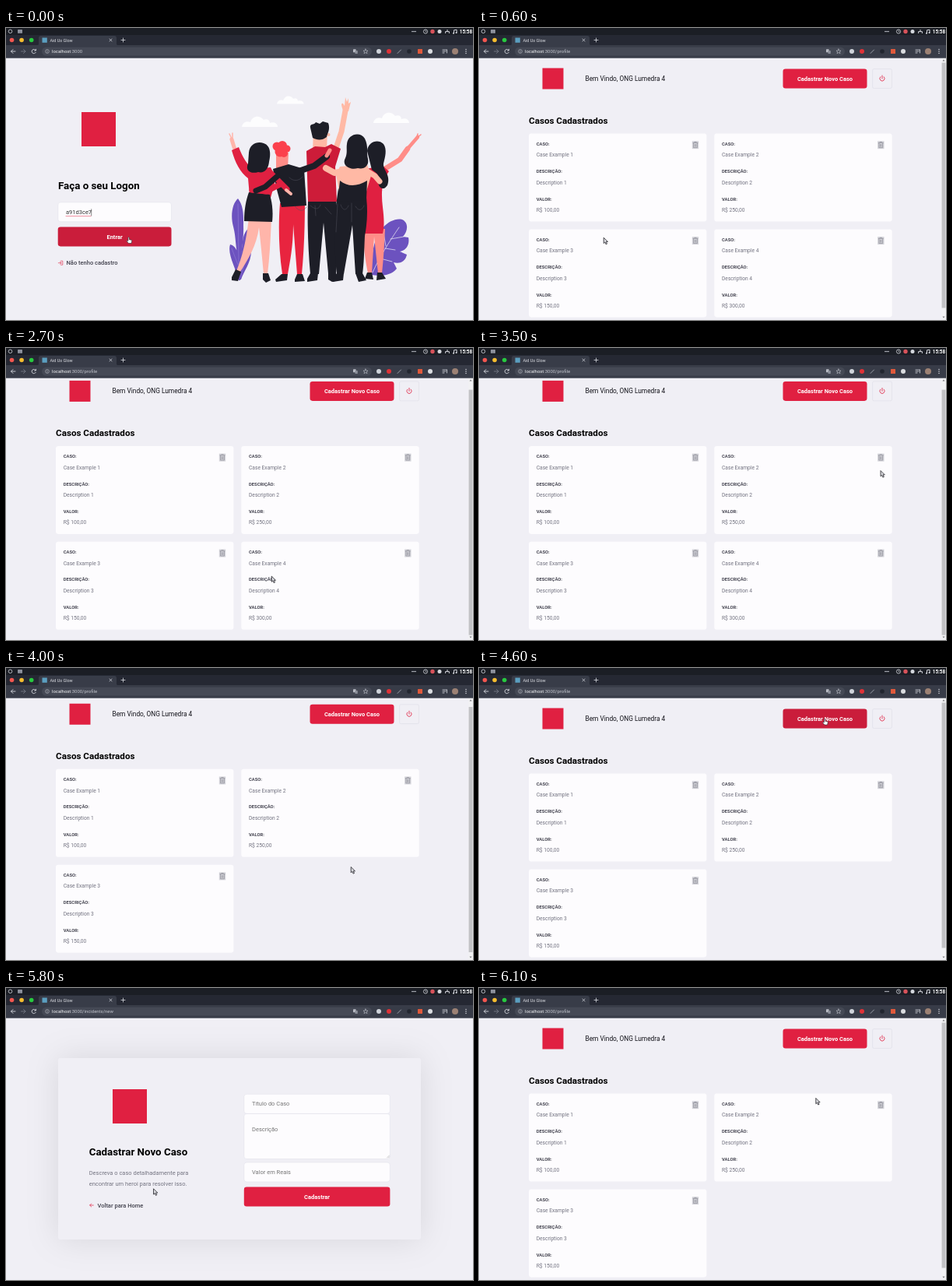
These frames come from a looping animation (600x375 px, 6.2 s). An HTML page:

```html
<!DOCTYPE html>
<html lang="pt">
<head>
<meta charset="utf-8">
<title>Aid Us Glow</title>
<style>
  html, body { margin: 0; width: 100%; height: 100%; overflow: hidden; background: #f0eff5; }
  svg { display: block; width: 600px; height: 375px; font-family: Roboto, sans-serif; }
</style>
</head>
<body>
<svg id="stage" viewBox="0 0 600 375" xmlns="http://www.w3.org/2000/svg"></svg>
<script>
const RED = '#e02041', RED_HOVER = '#ca1d3b', INK = '#41414d', GREY = '#737380';
const BG = '#f0eff5', PAPER = '#fdfcfe', LINE = '#dcdce6';
const BLACK = '#1d1e27', PURPLE = '#6c52bf', SEAM = '#50505c';

const text = (x, y, size, str, fill = GREY, weight = 400, anchor = 'start') =>
  `<text x="${x}" y="${y}" font-size="${size}" fill="${fill}" font-weight="${weight}" text-anchor="${anchor}">${str}</text>`;
const rect = (x, y, w, h, fill, r = 0, extra = '') =>
  `<rect x="${x}" y="${y}" width="${w}" height="${h}" rx="${r}" fill="${fill}" ${extra}/>`;
const dot = (x, y, r, fill, extra = '') => `<circle cx="${x}" cy="${y}" r="${r}" fill="${fill}" ${extra}/>`;
const shape = (fill, d) => `<path fill="${fill}" d="${d}"/>`;
const line = (color, width, d) =>
  `<path fill="none" stroke="${color}" stroke-width="${width}" stroke-linecap="round" stroke-linejoin="round" d="${d}"/>`;
const field = (x, y, w, h) => rect(x, y, w, h, PAPER, 3.3, `stroke="${LINE}" stroke-width=".5"`);
const button = (id, x, y, w, label) =>
  rect(x, y, w, 25, RED, 3.3, `id="${id}"`) + text(x + w / 2, y + 15.2, 7.5, label, '#fff', 700, 'middle');
const mark = (cx, cy, size) => rect(cx - size / 2, cy - size / 2, size, size, RED);

function cloud(x, y, s) {
  return `<g transform="translate(${x} ${y}) scale(${s})">` +
    shape('#fdfdfe', 'M0 14C1 8 6 6 11 8C13 0 23-2 28 5C32 3 36 5 36 9C42 7 46 10 46 14Z') + '</g>';
}

function illustration() {
  const skin = '#ffb5aa', peach = '#ffb9a5', coral = '#ff8d88', pants = '#e8243f', shirt = '#cd1c39';
  return cloud(303, 113, 1) + cloud(348, 87, .75) + cloud(472, 108, 1) +
    // plants
    shape(PURPLE, 'M299 324C295 308 284 290 288 278C296 280 299 290 299 297C294 280 296 270 292 255C288 240 291 225 298 219C306 229 305 244 305 254C306 276 299 302 301 324Z') +
    shape(PURPLE, 'M300 323C299 301 303 288 304 274C305 262 312 255 317 255C319 265 314 275 315 286C315 302 305 313 302 323Z') +
    line('#9a87dc', .5, 'M300 320C298 290 299 260 298 226M302 318C308 298 310 280 314 262M298 304L290 283') +
    shape(PURPLE, 'M468 317C470 300 470 286 475 272C480 256 496 243 509 246C518 250 516 262 510 268L517 269C519 278 514 286 506 287L515 291C513 301 505 303 498 301L502 309C493 320 478 318 468 317Z') +
    line('#f0eff5', .7, 'M471 314C480 294 492 275 505 256M487 283L500 285M481 296L496 300M494 271L511 268M488 280L485 263') +
    // woman on the left
    line(skin, 5, 'M290 143L293 153L299 167') + line(skin, 1.5, 'M290 142L287 136M291 141L291 135') +
    shape(skin, 'M312 244L341 244C340 268 339 292 336 316L331 316C329 294 327 274 325 256C322 280 311 297 301 313L296 312C305 290 309 270 312 244Z') +
    shape(BLACK, 'M295 310L302 313L298 325L290 324L290 320ZM330 315L337 315L340 324L334 327L330 323Z') +
    shape(RED, 'M290 157L299 153C304 166 310 176 317 181L340 179L347 193L340 218L313 216L311 193C301 186 294 172 290 157Z') +
    shape(BLACK, 'M312 211L339 214C343 228 343 240 342 249L306 248C306 234 308 222 312 211Z') +
    shape(BLACK, 'M312 160C313 149 323 145 331 148C341 151 340 164 338 172C337 182 331 187 324 185C314 188 307 183 311 174Z') +
    // red-haired friend
    shape(pants, 'M352 225L384 222C384 252 383 286 380 316L374 316L369 252C369 280 365 299 362 316L355 316C350 282 350 250 352 225Z') +
    shape(BLACK, 'M354 316L362 316L361 324L347 326L346 323ZM374 316L381 316L384 325L371 326L371 323Z') +
    shape(coral, 'M347 160L363 160L362 181L347 181Z') +
    shape(BLACK, 'M343 181L363 175L383 181L386 228L354 230L347 204Z') +
    [[348, 152, 5.5], [355, 151, 6], [361, 155, 4.5], [352, 159, 6.5], [357, 161, 5]].map(c => dot(...c, '#fb414d')).join('') +
    // tall man
    line(peach, 7, 'M422 160L431 133L436 106') + shape(peach, 'M433 106C431 100 430 96 433 97L435 100L436 89L438 95L440 90L440 97L443 95L440 107Z') +
    shape(BLACK, 'M388 221L424 221C428 246 427 283 424 315L414 315L408 250L402 316L391 316C388 283 387 250 388 221Z') +
    shape(BLACK, 'M391 315L401 315L400 324L387 326L387 322ZM414 315L424 315L427 324L419 326L414 323Z') +
    shape(peach, 'M395 132L413 132L412 158L394 158Z') + dot(414.5, 137, 2, peach) +
    shape(shirt, 'M386 158L397 152L410 153L418 149L430 155L423 178L425 223L388 223Z') +
    shape(BLACK, 'M391 128C390 122 396 125 398 121L403 123L407 120L414 122C417 130 413 135 412 140C406 145 399 144 394 141Z') +
    // linked arms
    line(BLACK, 8, 'M376 184L396 177L412 165') + line(coral, 5, 'M412 164L416 157') +
    line(RED, 7, 'M338 184L350 196L361 207') + line(skin, 4, 'M360 208L366 213') +
    line(RED, 7, 'M316 208L334 210L352 201') + line(BLACK, 7, 'M349 190L333 204L321 209') +
    line(SEAM, .5, 'M364 192C370 198 377 196 381 191M371 229C377 236 382 236 386 230M397 228L398 241M410 230L418 239M391 228C398 234 402 233 404 227') +
    // woman on the right
    line(coral, 6.5, 'M485 182L506 169L516 155') + line(coral, 4.5, 'M516 155L529 140') + line(coral, 1.5, 'M529 140L533 137M528 140L529 136') +
    shape(coral, 'M459 258L487 258C486 280 485 297 483 315L478 315L473 268L470 315L465 315C461 296 459 278 459 258Z') +
    shape(BLACK, 'M464 314L470 314L472 323L461 322ZM477 314L483 314L488 322L476 324Z') +
    shape(RED, 'M460 182L483 176L492 184C482 198 482 213 484 230C486 246 486 256 484 264L455 264C455 235 456 202 460 182Z') +
    shape(BLACK, 'M464 158C465 146 478 142 485 149C490 156 487 166 485 174C484 182 495 189 490 202C484 211 476 204 479 193C479 187 474 185 470 182Z') +
    // long-haired woman
    shape(BLACK, 'M427 206L461 204C465 226 465 246 461 267C460 289 460 302 458 316L449 316L445 253L434 316L425 316C421 280 421 244 427 206Z') +
    shape(BLACK, 'M425 315L434 315L433 324L420 326L420 322ZM449 315L458 315L463 324L453 326Z') +
    line(peach, 8, 'M434 184L422 186L411 180') + line(peach, 7, 'M461 182L474 190L480 197') +
    shape(peach, 'M429 178L464 175L469 190L463 210L428 210L424 188Z') +
    shape(BLACK, 'M429 196C440 205 452 203 464 196L463 221L426 223Z') +
    shape(BLACK, 'M438 149C439 136 455 132 461 142C466 152 463 160 465 168C467 178 459 182 452 180C441 183 431 176 436 167C439 160 437 155 438 149Z') +
    line(SEAM, .5, 'M430 227C433 236 438 234 440 228M449 229C453 236 458 234 460 228M444 225L444 249M426 226L424 262');
}

const logonPage = () => `<g id="logon">` + mark(119, 130, 44) +
  text(67, 207, 13.33, 'Faça o seu Logon', '#000', 700) +
  field(66.8, 223.8, 145.6, 25) + text(77, 239.4, 7.5, 'a91d3ce7', '#333') +
  line(RED, .5, 'M77 241.6H109') + line('#111', .5, 'M109.7 232.8V241') +
  button('enter', 66.7, 255.4, 145.8, 'Entrar') +
  line(RED, .6, 'M70.5 299.2H72.8V304.2H70.5M67.3 301.7H71M69.5 300.2L71.1 301.7L69.5 303.2') +
  text(77.5, 304.3, 7.5, 'Não tenho cadastro', INK, 500) + illustration() + '</g>';

function trash(x, y) {
  return rect(x - 4.2, y - 5, 8.4, 10, '#d4d4da') +
    line('#93939d', .8, `M${x - 3} ${y - 2.7}h6M${x - 1.2} ${y - 3.8}h2.4M${x - 2.4} ${y - 2.5}v6h4.8v-6M${x - .8} ${y - .8}v2.8M${x + .8} ${y - .8}v2.8`);
}

function caseCard(number, price) {
  const x = number % 2 ? 64 : 302.3, y = number < 3 ? 135.5 : 258.4;
  const rows = [['CASO:', `Case Example ${number}`], ['DESCRIÇÃO:', `Description ${number}`], ['VALOR:', `R$ ${price},00`]];
  return `<g id="case${number}">` + rect(x, y, 228.4, 113, PAPER, 3.3) + trash(x + 214, y + 14.7) +
    rows.map(([label, value], i) =>
      text(x + 9.7, y + 15.3 + i * 35.4, 5.83, label, INK, 700) +
      text(x + 9.7, y + 29.8 + i * 35.4, 6.67, value)).join('') + '</g>';
}

const profilePage = () => `<g id="profile"><g id="scroller">` + mark(95, 65, 27) +
  text(136.5, 67.8, 8.33, 'Bem Vindo, ONG Lumedra 4', '#13131a') +
  button('create', 390.5, 52.5, 108, 'Cadastrar Novo Caso') +
  rect(505.6, 52.6, 24.8, 24.8, 'none', 1.7, `stroke="${LINE}" stroke-width=".6"`) +
  line(RED, .8, 'M518 61V65M515.8 62.7A3.1 3.1 0 1 0 520.2 62.7') +
  text(64, 122.6, 11.67, 'Casos Cadastrados', '#000', 700) +
  [100, 250, 150, 300].map((price, i) => caseCard(i + 1, price)).join('') + '</g>' +
  rect(594, 38, 6, 337, '#f1f1f3') + rect(594.6, 44.5, 4.8, 315, '#c1c1c4', 0, 'id="thumb"') +
  shape('#77777c', 'M595.5 42.5L597 40.5L598.5 42.5ZM595.5 370.5L597 372.5L598.5 370.5Z') + '</g>';

const formPage = () => `<g id="form">` +
  rect(67, 90, 466, 233, BG, 3.3, 'style="filter:drop-shadow(0 0 20.8px rgba(0,0,0,.1))"') + mark(159, 152, 44) +
  text(106.7, 214.6, 13.33, 'Cadastrar Novo Caso', '#000', 700) +
  text(106.7, 240.4, 7.5, 'Descreva o caso detalhadamente para') +
  text(106.7, 253.7, 7.5, 'encontrar um heroi para resolver isso.') +
  line(RED, .7, 'M112.3 279H107.7M109.7 277L107.7 279L109.7 281') +
  text(117.5, 281.8, 7.5, 'Voltar para Home', INK, 500) +
  field(305.8, 136.3, 187.5, 25) + field(305.8, 161.5, 187.5, 58) + field(305.8, 224, 187.5, 25) +
  line('#888', .4, 'M489.5 218L492.5 215M491.3 218L492.5 216.8') +
  text(316, 151.4, 7.5, 'Título do Caso', '#757575') + text(316, 184.2, 7.5, 'Descrição', '#757575') +
  text(316, 239.2, 7.5, 'Valor em Reais', '#757575') +
  button('submit', 305.8, 255.6, 187.6, 'Cadastrar') + '</g>';

function browserChrome() {
  const pale = '#d5d7de';
  return rect(0, 0, 600, 9, '#1b1e25') + rect(0, 9, 600, 13.5, '#252833') + rect(0, 22, 600, 16.7, '#383c48') +
    dot(5.5, 4.3, 2.3, 'none', `stroke="${pale}" stroke-width=".8"`) + rect(15, 2, 6, 4.8, '#8c909b', .6) +
    [522, 524, 526].map(x => dot(x, 4.5, .8, pale)).join('') +
    dot(539, 4.5, 2.6, 'none', `stroke="${pale}" stroke-width=".8"`) + line(pale, .6, 'M539 3V4.7H540.2') +
    dot(548, 4.5, 2.7, '#d8525b') + dot(557, 4.5, 2.5, pale) +
    line(pale, 1, 'M567 2.4V4.5M564.6 6.5V4.6H569.4V6.5M575.5 6.7V2.8L579 2.2V6') + dot(575, 6.7, 1, pale) + dot(578.5, 6.1, 1, pale) +
    text(599, 6.8, 6.3, '15:58', '#fff', 700, 'end') +
    ['#f2564f', '#f6bd2e', '#27c93f'].map((c, i) => dot(7.5 + i * 12.6, 15.5, 2.8, c)).join('') +
    shape('#383c48', 'M40 22.5C42 22 42 21 42 19V13Q42 10 45 10H139Q142 10 142 13V19C142 21 142 22 144 22.5Z') +
    rect(46.5, 12.5, 6.3, 6.3, '#5b9fc0') + text(56.5, 17.7, 5.45, 'Aid Us Glow', '#dfe1e6') +
    line(pale, .8, 'M133 14L136 17M136 14L133 17M148 15.5H153M150.5 13V18') +
    line(pale, .9, 'M12 30H6.5M9 27.5L6.5 30L9 32.5M38.2 28.7A2.7 2.7 0 1 0 38.2 31.4M38.4 27.2V29H36.6') +
    line('#747985', .9, 'M19.5 30H25M22.5 27.5L25 30L22.5 32.5') +
    rect(46, 24.7, 424, 10.8, '#454955', 5.4) +
    dot(53, 30, 2.4, 'none', 'stroke="#b9bcc5" stroke-width=".6"') + line('#b9bcc5', .6, 'M53 30V31.2M53 28.7V28.8') +
    `<text x="59" y="32.1" font-size="5.95" fill="#f4f5f7">localhost<tspan fill="#c3c6ce" id="path"></tspan></text>` +
    rect(446, 27.3, 3.6, 4, '#b9bcc5', .5) + rect(448.5, 29, 3.3, 4, '#8b8f9a', .5) +
    line('#c3c6ce', .6, 'M462 27L462.9 29.1L465 29.2L463.4 30.6L464 32.7L462 31.5L460 32.7L460.6 30.6L459 29.2L461.1 29.1Z') +
    dot(479, 30, 3, '#cfd3da') + dot(492, 30, 3, '#df3237') + line('#999da7', 1, 'M503 32.5L507.5 28') +
    dot(518, 30, 2.8, '#222630') + rect(529, 27, 6, 6, '#e0593b', .5) + dot(545, 30, 3, '#dadce0') +
    line(pale, .8, 'M561 28H566M561 30H565M561 32H563M566.5 28V32') + dot(577, 30, 4, '#9c8174') +
    [27.5, 30, 32.5].map(y => dot(591, y, .75, pale)).join('');
}

const cursors = `<g id="cursor" stroke="#24242a" stroke-width=".8" stroke-linejoin="round">
  <path id="arrow" fill="#d9d9de" d="M0 0V7.3L1.7 5.8L2.9 8.6L4.3 8L3.1 5.3H5.3Z"/>
  <path id="hand" fill="#fff" stroke-width=".6" d="M-.6 .5Q.2-.4 .8 .5V3.2L3.6 3.8Q4.4 4 4.2 5L3.6 8H0L-2.4 5.2Q-2.2 4-1 4.8L-.6 5Z"/></g>`;

const stage = document.getElementById('stage');
stage.innerHTML = rect(0, 0, 600, 375, BG) + logonPage() + profilePage() + formPage() + browserChrome() + cursors;
const el = id => document.getElementById(id);
const show = (id, on) => el(id).setAttribute('visibility', on ? 'inherit' : 'hidden');

// Pointer tip: time, x, y
const pointerPath = [
  [0, 157.5, 268.5], [600, 160.2, 269.2], [700, 158, 266], [900, 78, 160], [1200, 290, 190], [1400, 480, 58],
  [1500, 480, 58], [1800, 264.3, 73], [2200, 94, 150], [2450, 440, 52], [2700, 341.2, 293], [2900, 320, 298],
  [3150, 80, 190], [3400, 516, 54], [3600, 516, 261], [3700, 516, 261], [4000, 443.2, 255.5], [4300, 443, 220],
  [4600, 444, 65], [4800, 444, 65], [5000, 405, 267], [5100, 413.6, 302.4], [5200, 413.6, 302.4],
  [5500, 320, 200], [5900, 146, 277], [6000, 260, 210], [6100, 432.8, 141.4], [6200, 432.8, 141.4]];
const scrollPath = [[0, 0], [1600, 0], [2200, 9.6], [3800, 9.6], [4300, 0], [6200, 0]];

function sample(keys, t, column) {
  const i = Math.max(1, keys.findIndex(k => k[0] >= t));
  const a = keys[i - 1], b = keys[i];
  return a[column] + (b[column] - a[column]) * (t - a[0]) / (b[0] - a[0]);
}

function pageAt(t) {
  if (t < 300) return 'logon';
  return t >= 4800 && t < 6000 ? 'form' : 'profile';
}

const paths = { logon: ':3000', profile: ':3000/profile', form: ':3000/incidents/new' };
const hotspots = {
  logon: [['enter', 67, 255, 146, 26]],
  profile: [['create', 390, 52, 109, 26], ['', 505, 52, 26, 26], ['', 512, 268, 9, 10]],
  form: [['submit', 306, 255, 188, 26], ['', 107, 273, 70, 12]]
};

function render(t) {
  const page = pageAt(t);
  const x = sample(pointerPath, t, 1), y = sample(pointerPath, t, 2), scroll = sample(scrollPath, t, 1);
  for (const id in paths) show(id, id === page);
  el('path').textContent = paths[page];
  show('case4', t < 3700);
  el('scroller').setAttribute('transform', `translate(0 ${-scroll})`);
  el('thumb').setAttribute('y', 44.5 + scroll * .95);

  const pageY = page === 'profile' ? y + scroll : y;
  const hit = hotspots[page].find(([, left, top, w, h]) =>
    x >= left && x <= left + w && pageY >= top && pageY <= top + h);
  for (const id of ['enter', 'create', 'submit'])
    el(id).setAttribute('fill', hit && hit[0] === id ? RED_HOVER : RED);
  el('cursor').setAttribute('transform', `translate(${x} ${y})`);
  show('hand', !!hit);
  show('arrow', !hit);
}

const start = performance.now();
function tick() {
  const elapsed = (performance.now() - start) % 6200;
  render(Math.floor(elapsed / 100) * 100);
  requestAnimationFrame(tick);
}
tick();
</script>
</body>
</html>
```
